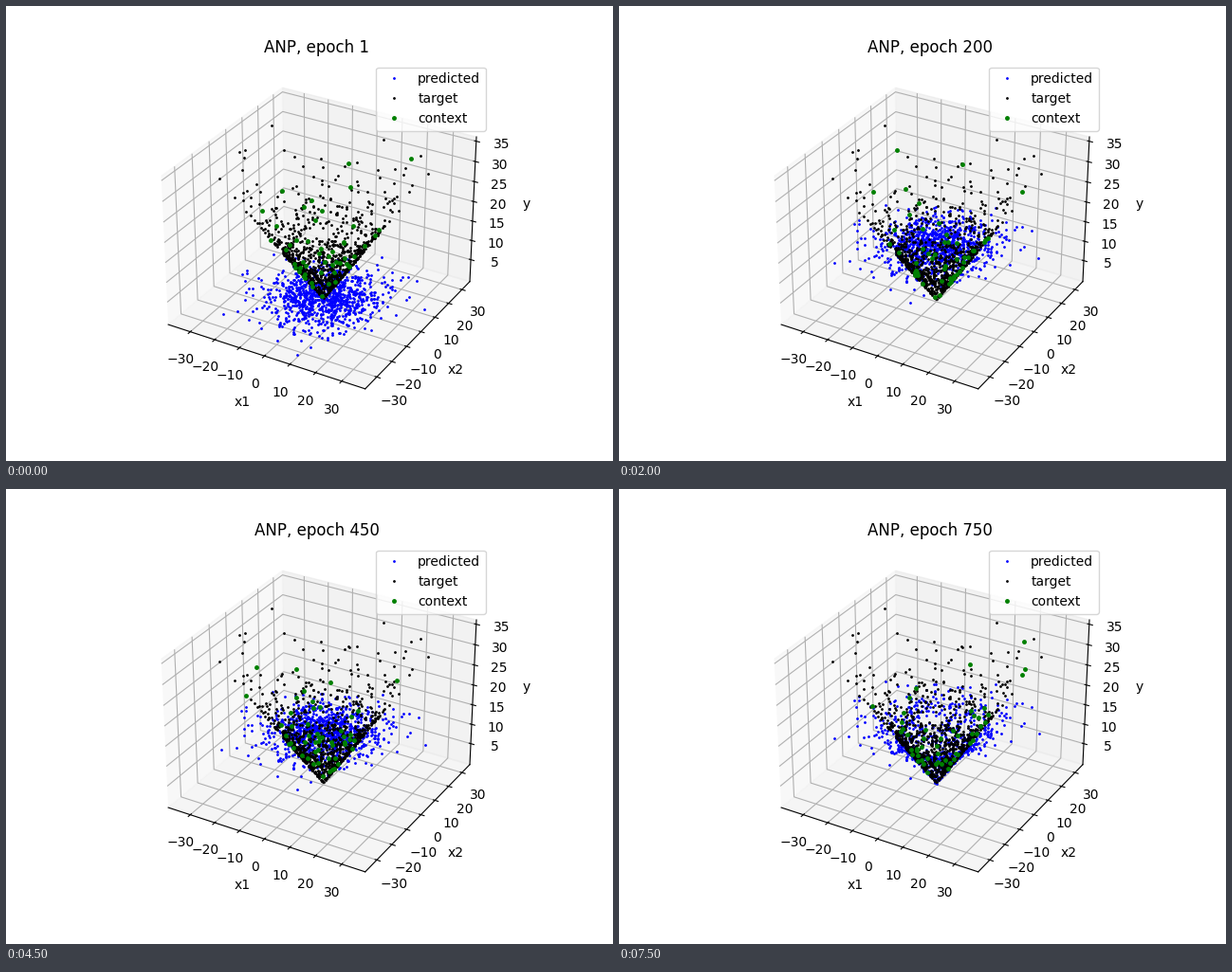
Write a matplotlib script that moves like this. It is 640 px wide and 480 px high and loops after 8 s.

```python
import matplotlib.pyplot as plt
import numpy as np
from matplotlib.animation import FuncAnimation

STEPS, N, N_CONTEXT = 16, 1000, 50
SLOPE = 0.96          # target cone: y = SLOPE * |x|
Z_TOP = 36.06
# the widest samples, which shape the outline of the cloud
WIDE = [(-25, -25), (35, 9), (24, 24), (11, -34.5), (-31, 16), (-33, -1),
        (5, 32)]

rng = np.random.default_rng(4)


def make_samples():
    """Normal samples that stay inside the axes, plus the widest ones."""
    p = rng.normal(0, 10, (2 * N, 2))
    p = p[np.hypot(*p.T) < 33]
    return np.vstack([WIDE, p])[:N].T


x1, x2 = make_samples()
target = SLOPE * np.hypot(x1, x2)
noise = rng.normal(0, 0.25, N).clip(-0.65, 0.65)
# the same samples along and across the line of sight
depth = 0.866 * x2 - 0.5 * x1
side = 0.866 * x1 + 0.5 * x2
contexts = [rng.choice(N, N_CONTEXT, replace=False) for _ in range(STEPS)]


def predict(step):
    """A flat sheet that rises, creases into a trough, then forms a cone."""
    level = np.interp(step, [0, 1, 2, 3, 4, 10, 11, 13, 15],
                      [0.6, 5, 5, 10.6, 13.8, 12.7, 12, 21.5, 16.5])
    bend = np.clip((step - 10) / 2, 0, 1)
    r = np.hypot(bend**2 * side, depth)
    cone = SLOPE * r / (1 + (r / level) ** 4) ** 0.25
    return (1 - bend) * level + bend * cone + noise


fig = plt.figure(figsize=(6.4, 4.8), dpi=100)
ax = fig.add_subplot(projection="3d")
ax.set(xlabel="x1", ylabel="x2", zlabel="y")
ax.set_xticks(range(-30, 31, 10))
ax.set_yticks(range(-30, 31, 10))
ax.set_zticks(range(5, 36, 5))
ax.set_xlim(-39.13, 38.87)
ax.set_ylim(-37.5, 36.0)


def dots(color, size, label):
    return ax.plot([], [], [], ".", color=color, markersize=size,
                   label=label)[0]


predicted = dots("blue", 2, "predicted")
truth = dots("black", 2, "target")
context = dots("green", 5, "context")
truth.set_data_3d(x1, x2, target)
ax.legend(loc="upper right")


def update(step):
    ax.set_title(f"ANP, epoch {50 * step or 1}")
    ax.set_zlim(-0.48 if step else -0.78, Z_TOP)
    predicted.set_data_3d(x1, x2, predict(step))
    c = contexts[step]
    context.set_data_3d(x1[c], x2[c], target[c])
    return predicted, truth, context


anim = FuncAnimation(fig, update, frames=STEPS, interval=500, repeat=True,
                     repeat_delay=0, blit=False)
plt.show()
```
